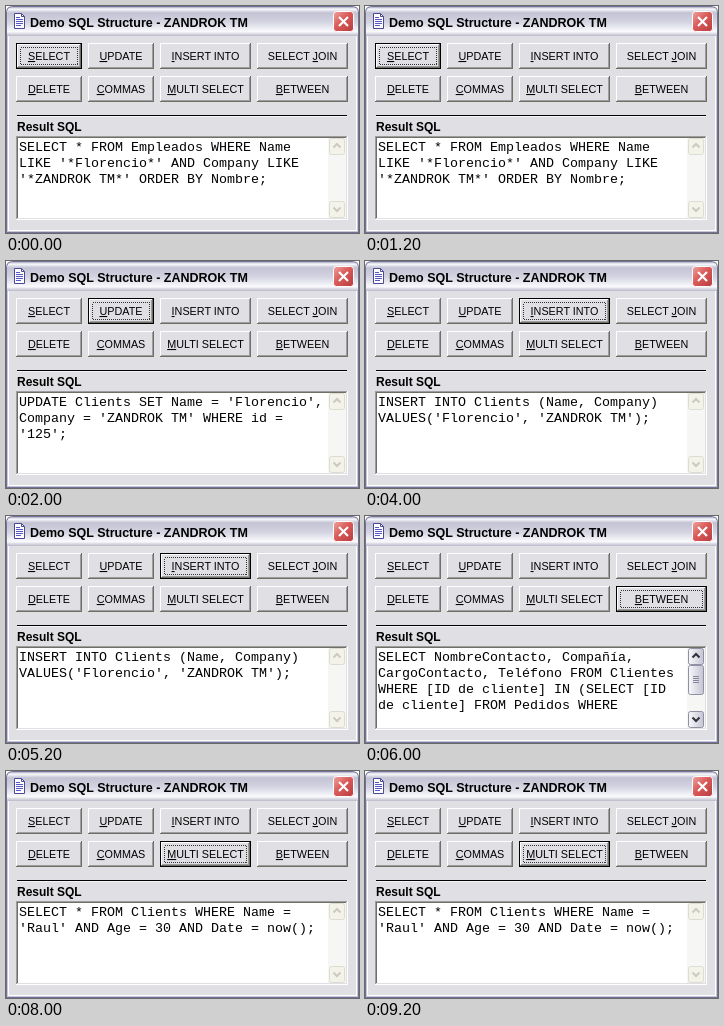
Recreate the animation shown at these times as an HTML page. Size 353 by 227 pixels, loop 10 s.

```html
<!DOCTYPE html>
<html lang="en">
<head>
<meta charset="utf-8">
<title>Demo SQL Structure</title>
<style>
html, body { margin: 0; width: 100%; height: 100%; overflow: hidden; background: #fff; }
svg { display: block; }
text { font-family: "Liberation Sans", Arial, sans-serif; white-space: pre; }
.title { font-size: 12.5px; font-weight: bold; }
.label { font-size: 12px; font-weight: bold; }
.caption { font-size: 10.8px; text-anchor: middle; }
.caption tspan { text-decoration: underline; }
.code text { font: 13.333px "Liberation Mono", "Courier New", monospace; }
rect { shape-rendering: crispEdges; }
rect[rx] { shape-rendering: auto; }
</style>
</head>
<body>
<svg width="353" height="227" viewBox="0 0 353 227">
  <defs>
    <linearGradient id="bar" x2="0" y2="1">
      <stop offset="0" stop-color="#a9a9ba"/>
      <stop offset=".07" stop-color="#fafaff"/>
      <stop offset=".2" stop-color="#c3c3d4"/>
      <stop offset=".5" stop-color="#d2d2e0"/>
      <stop offset=".85" stop-color="#fafafd"/>
      <stop offset="1" stop-color="#b9b9c9"/>
    </linearGradient>
    <linearGradient id="red" x2="1" y2="1">
      <stop offset="0" stop-color="#eea4a0"/>
      <stop offset=".45" stop-color="#d95a58"/>
      <stop offset="1" stop-color="#b83c40"/>
    </linearGradient>
    <linearGradient id="silver" x2="1" y2="0">
      <stop offset="0" stop-color="#f8f8fb"/>
      <stop offset="1" stop-color="#c4c5d3"/>
    </linearGradient>
  </defs>

  <!-- window frame and title bar -->
  <path d="M0 227V7Q0 0 7 0H346Q353 0 353 7V227Z" fill="#73739a"/>
  <path d="M1 226V7Q1 1 7 1H346Q352 1 352 7V226Z" fill="#c6c6d8"/>
  <rect x="2" y="30" width="349" height="195" fill="#fff"/>
  <path d="M1 30V7Q1 1 7 1H346Q352 1 352 7V30Z" fill="url(#bar)"/>
  <rect x="3" y="30" width="347" height="194" fill="#e0dfe3"/>
  <path d="M8.500 7.500h7l3 3v12h-10z" fill="#fff" stroke="#4a4a94"/>
  <path d="M15.500 7.500v3h3" fill="none" stroke="#4a4a94"/>
  <path d="M10 11.500h4M10 13.500h7M10 15.500h7M10 17.500h7M10 19.500h5" stroke="#5656c8"/>
  <text class="title" x="24" y="21">Demo SQL Structure - ZANDROK TM</text>
  <rect x="327.500" y="5.500" width="20" height="20" rx="3" fill="url(#red)" stroke="#fff"/>
  <path d="M333 11l9 9M342 11l-9 9" stroke="#fff" stroke-width="2.200"/>

  <g id="buttons"></g>

  <rect x="11" y="109" width="330" height="1"/>
  <rect x="11" y="110" width="330" height="1" fill="#f4f4f6"/>
  <text class="label" x="11" y="125">Result SQL</text>

  <!-- result box -->
  <rect x="10" y="130" width="332" height="84" fill="#fff"/>
  <rect x="10" y="130" width="331" height="83" fill="#9d9da1"/>
  <rect x="11" y="131" width="330" height="82" fill="#e0dfe3"/>
  <rect x="11" y="131" width="329" height="81" fill="#716f64"/>
  <rect x="12" y="132" width="328" height="80" fill="#fff"/>
  <g id="code" class="code"></g>
  <g id="scroll"></g>
</svg>
<script>
const COMPANY = "ZANDROK TM", PERSON = "Florencio";
const ROWS = [37, 70], HEIGHT = 26;

// x, width, captions from top to bottom with & before the access key
const columns = [
  [10, 66, "&SELECT", "&DELETE"],
  [82, 66, "&UPDATE", "&COMMAS"],
  [154, 91, "&INSERT INTO", "&MULTI SELECT"],
  [251, 91, "SELECT &JOIN", "&BETWEEN"]
];
const buttons = columns.flatMap(([x, w, ...captions]) =>
  captions.map((caption, row) => ({ x, y: ROWS[row], w, caption })));

const steps = [
  { button: "&SELECT", lines: ["SELECT * FROM Empleados WHERE Name", `LIKE '*${PERSON}*' AND Company LIKE`, `'*${COMPANY}*' ORDER BY Nombre;`] },
  { button: "&UPDATE", lines: [`UPDATE Clients SET Name = '${PERSON}',`, `Company = '${COMPANY}' WHERE id =`, "'125';"] },
  { button: "&INSERT INTO", lines: ["INSERT INTO Clients (Name, Company)", `VALUES('${PERSON}', '${COMPANY}');`] },
  { button: "&BETWEEN", scrolls: true, lines: ["SELECT NombreContacto, Compañía,", "CargoContacto, Teléfono FROM Clientes", "WHERE [ID de cliente] IN (SELECT [ID", "de cliente] FROM Pedidos WHERE"] },
  { button: "&MULTI SELECT", lines: ["SELECT * FROM Clients WHERE Name =", "'Raul' AND Age = 30 AND Date = now();"] }
];

const box = (x, y, w, h, fill) => `<rect x="${x}" y="${y}" width="${w}" height="${h}" fill="${fill}"/>`;

function drawButton({ x, y, w, caption }, focused) {
  const h = HEIGHT, inset = focused ? 1 : 0;
  const label = caption.replace(/&(.)/, "<tspan>$1</tspan>");
  const bevel = ["#716f64", "#fff", "#9d9da1", "#e0dfe3"].map((color, n) => {
    const a = inset + (n >> 1), cut = 2 * a + n % 2;
    return box(x + a, y + a, w - cut, h - cut, color);
  }).join("");
  const dots = `<rect x="${x + 4.5}" y="${y + 4.5}" width="${w - 9}" height="${h - 9}" fill="none" stroke="#333" stroke-dasharray="1 1"/>`;
  return (focused ? box(x, y, w, h, "#000") : "") + bevel + (focused ? dots : "")
    + `<text class="caption" x="${x + w / 2}" y="${y + 17}">${label}</text>`;
}

function drawScrollbar(active) {
  const [stroke, fill, ink] = active
    ? ["#8f90a3", "url(#silver)", "#30303c"]
    : ["#dddcd2", "#f4f3ea", "#cbcac0"];
  const part = (y, h) =>
    `<rect x="323.5" y="${y + .5}" width="15" height="${h - 1}" rx="2" fill="${fill}" stroke="${stroke}"/>`;
  const arrow = (y, d) =>
    `<path d="M327.500 ${y}l3.500 ${d}l3.500 ${-d}" fill="none" stroke="${ink}" stroke-width="2"/>`;
  const grip = [160, 162, 164, 166].map(y => box(328, y, 6, 1, "#85869a")).join("");
  return box(322, 132, 18, 80, "#f6f6f4") + part(132, 17) + part(195, 17)
    + arrow(141.5, -3.5) + arrow(201.5, 3.5) + (active ? part(149, 30) + grip : "");
}

const layer = id => document.getElementById(id);
let shown = -1;

function draw() {
  const index = Math.floor(performance.now() % 10000 / 2000);
  if (index !== shown) {
    shown = index;
    const step = steps[index];
    layer("buttons").innerHTML = buttons.map(b => drawButton(b, b.caption === step.button)).join("");
    layer("code").innerHTML = step.lines.map((line, n) => `<text x="13" y="${145 + 16 * n}">${line}</text>`).join("");
    layer("scroll").innerHTML = drawScrollbar(step.scrolls);
  }
  requestAnimationFrame(draw);
}
draw();
</script>
</body>
</html>
```
